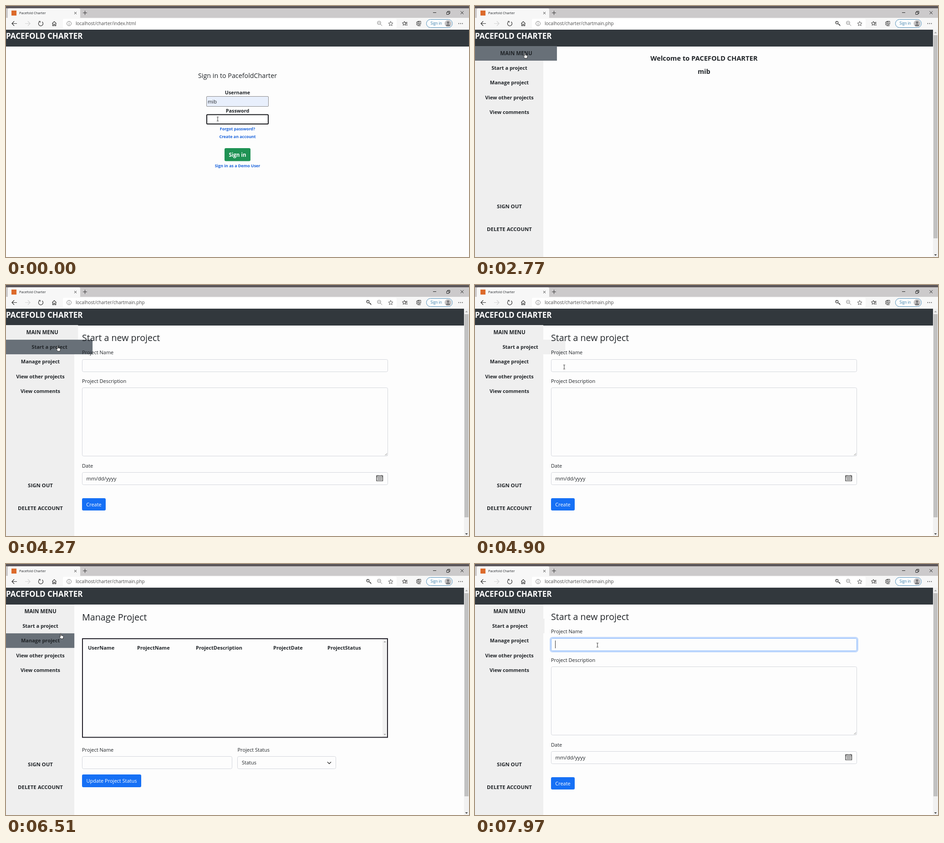
Animation, 1017 px wide and 551 px high, one loop 8000 ms. Source, as an HTML page with a canvas:

```html
<!DOCTYPE html>
<html lang="en">
<head>
<meta charset="utf-8">
<title>Pacefold Charter</title>
<style>
html, body { margin: 0; width: 100%; height: 100%; overflow: hidden; background: #fdfdfd; }
canvas { display: block; }
</style>
</head>
<body>
<canvas id="stage" width="1017" height="551"></canvas>
<script>
const ctx = document.getElementById('stage').getContext('2d');
const LOOP = 8000, INK = '#202428', BLUE = '#1670f5', LINK = '#1a63dc', LINE = '#d3d6dc';
const CLICK = 1600, HOME = 1950, START = 4200, MANAGE = 5420, AGAIN = 7300, FOCUS = 7870;

// ---- drawing helpers ----
function rect(x, y, w, h, color) {
  ctx.fillStyle = color;
  ctx.fillRect(x, y, w, h);
}

function box(x, y, w, h, r, fill, stroke, width = 1) {
  ctx.beginPath();
  ctx.roundRect(x, y, w, h, r);
  if (fill) { ctx.fillStyle = fill; ctx.fill(); }
  if (stroke) { ctx.strokeStyle = stroke; ctx.lineWidth = width; ctx.stroke(); }
}

// y is the middle of the capital letters
function text(str, x, y, size = 11, weight = 400, color = INK, align = 'left') {
  ctx.font = `${weight} ${size}px "Open Sans", "Noto Sans", sans-serif`;
  ctx.textAlign = align;
  ctx.fillStyle = color;
  ctx.fillText(str, x, y + size * 0.357);
}

const bold = (str, x, y, size = 11, color = INK) => text(str, x, y, size, 700, color, 'center');

function line(d, color = '#3c3c3c', width = 1.1) {
  ctx.strokeStyle = color;
  ctx.lineWidth = width;
  ctx.stroke(new Path2D(d));
}

function shape(d, color) {
  ctx.fillStyle = color;
  ctx.fill(new Path2D(d));
}

const circle = (x, y, r) => `M${x - r} ${y}a${r} ${r} 0 1 0 ${2 * r} 0a${r} ${r} 0 1 0 ${-2 * r} 0`;

function star(x, y, r) {
  const points = Array.from({ length: 10 }, (_, i) => {
    const a = i * Math.PI / 5 - Math.PI / 2, k = i % 2 ? r * 0.45 : r;
    return `${x + k * Math.cos(a)} ${y + k * Math.sin(a)}`;
  });
  return `M${points.join('L')}Z`;
}

function field(x, y, w, h) {
  box(x + .5, y + .5, w - 1, h - 1, 3, '#fdfdfd', LINE);
}

function button(label, x, y, w, h) {
  box(x, y, w, h, 3, BLUE);
  text(label, x + w / 2, y + h / 2 + .5, 11, 400, '#fff', 'center');
}

// ---- motion helpers ----
// the standard CSS "ease" curve
function ease(p) {
  if (p <= 0) return 0;
  if (p >= 1) return 1;
  const bez = (a, b, u) => 3 * a * u * (1 - u) ** 2 + 3 * b * u * u * (1 - u) + u ** 3;
  let lo = 0, hi = 1;
  for (let i = 0; i < 20; i++) {
    const mid = (lo + hi) / 2;
    if (bez(.25, .25, mid) < p) lo = mid; else hi = mid;
  }
  return bez(.1, 1, lo);
}

// toggles alternate between pointer entering and leaving
function hover(toggles, t) {
  let from = 0, to = 0, since = 0, span = 1;
  const at = time => from + (to - from) * ease((time - since) / span);
  for (const time of toggles) {
    if (time > t) break;
    from = at(time);
    to = 1 - to;
    since = time;
    span = 1500 * Math.abs(to - from) + 1;
  }
  return { on: to === 1, grow: at(t) };
}

// time, x, y, pointer kind until the next stop
const PATH = [
  [0, 465, 248, 'beam'], [650, 465, 248, 'beam'], [800, 473, 262, 'arrow'],
  [1250, 497, 324, 'hand'], [1450, 498, 334, 'hand'], [HOME, 498, 334, 'arrow'],
  [2240, 160, 116, 'hand'], [2420, 110, 107, 'hand'], [3400, 113, 112, 'hand'],
  [3600, 117, 133, 'hand'], [3850, 114, 140, 'hand'], [4500, 116, 139, 'hand'],
  [4800, 172, 147, 'hand'], [4870, 190, 164, 'beam'], [4900, 196, 180, 'beam'],
  [5060, 188, 180, 'arrow'], [5160, 150, 173, 'hand'], [5350, 113, 172, 'hand'],
  [5500, 114, 174, 'hand'], [5610, 118, 190, 'hand'], [5660, 155, 198, 'arrow'],
  [5900, 240, 240, 'arrow'], [6250, 220, 190, 'arrow'], [6490, 130, 160, 'hand'],
  [6510, 122, 158, 'hand'], [6800, 113, 172, 'hand'], [7050, 112, 156, 'hand'],
  [7250, 108, 142, 'hand'], [7500, 199, 154, 'arrow'], [7550, 235, 172, 'beam'],
  [7650, 269, 178, 'beam'], [LOOP, 269, 178, 'beam']
];

const MENU = [
  ['MAIN MENU', [2240, 3495]],
  ['Start a project', [3495, 4870, 7050, 7500]],
  ['Manage project', [5160, 5630, 6500, 7050]],
  ['View other projects', []],
  ['View comments', []]
];

function pointer(t) {
  let i = PATH.findIndex(k => k[0] > t) - 1;
  if (i < 0) i = PATH.length - 2;
  const [t0, x0, y0, kind] = PATH[i], [t1, x1, y1] = PATH[i + 1];
  const p = (t - t0) / (t1 - t0);
  ctx.save();
  ctx.translate(x0 + (x1 - x0) * p, y0 + (y1 - y0) * p);
  if (kind === 'beam') {
    line('M-2 -4.5H-.5L0 -4L.5 -4.5H2M0 -4V4M-2 4.5H-.5L0 4L.5 4.5H2', '#333', 1);
  } else {
    const d = kind === 'hand'
      ? 'M-2.5 1V-5.2Q-1.7 -6.6 -.8 -5.2V-1.2L3 -.4Q4.3 0 4.2 1.5L3.4 6H-1.6L-4.8 1.8Q-4.6 .2 -2.5 1.6Z'
      : 'M-3 -6V5L-.6 2.8L1 6.5L2.6 5.8L1 2.3H4.4Z';
    shape(d, '#fff');
    line(d, '#222', .9);
  }
  ctx.restore();
}

// ---- browser frame ----
function chrome(t) {
  const loading = t >= CLICK && t < HOME;
  rect(0, 0, 1017, 5, '#5b565a');
  rect(0, 5, 1017, 21, '#cccacb');
  rect(0, 26, 1017, 26, '#f7f7f7');
  box(4, 5, 159, 24, [3, 3, 0, 0], '#f7f7f7');
  if (loading) {
    const a = t / 150;
    ctx.beginPath();
    ctx.arc(17, 15, 4, a, a + 1.5);
    ctx.strokeStyle = '#666';
    ctx.lineWidth = 1.3;
    ctx.stroke();
  } else {
    rect(12, 10, 11, 11, '#dc6a2b');
  }
  text('Pacefold Charter', 29, 15.5, 7.5);
  line('M150 13L155 18M155 13L150 18M169 15H178M173.5 10.5V19.5', '#333', 1);
  line('M938 14.5H945M998.5 11.5L1005 18M1005 11.5L998.5 18', '#222', 1);
  line('M968 13.5H973V18.5H968ZM970 13V11.5H975V16.5H973', '#222', 1);

  line('M24 38.5H13M18 33.5L13 38.5L18 43.5', '#333', 1.2);
  line('M42 38.5H53M48 33.5L53 38.5L48 43.5', '#d2d2d2', 1.2);
  if (loading) line('M72.5 34.5L80.5 42.5M80.5 34.5L72.5 42.5', '#333', 1.2);
  else line('M73.5 34.5A5 5 0 1 0 79.5 34.7M72 33.5H75V36.5', '#333', 1.2);
  line('M101.5 38.5L106 34L110.5 38.5M102.5 37.5V43.5H104.8V40H107.2V43.5H109.5V37.5', '#333', 1.2);

  box(125, 28, 733, 21, 3, '#fff');
  line(circle(138.5, 38.5, 4.8) + 'M138.5 37.5V41.5M138.5 35V36.2', '#666', .9);
  text('localhost/charter/' + (t < HOME ? 'index.html' : 'chartmain.php'), 153, 38.5, 10, 400, '#4c4c4c');
  if (t >= CLICK) line(circle(795, 36.5, 2.8) + 'M797 38.5L802.5 43.5M800 41.2L801.5 40M794 35.5H795', '#333', 1.2);
  line(circle(819.5, 37, 3.7) + 'M822.2 39.7L826 43.5M817.8 37H821.2', '#777', 1);
  line(star(845, 39, 5.3), '#555', 1);
  line(star(875, 38.5, 4.8) + 'M877 36H882M878 39H882M879 42H882', '#333', 1);
  line('M902 35H908V41.5H902ZM904.5 35V33.5H911V40H908M905 36.5V40M903.3 38.2H906.7M904 43.5H910V42', '#333', 1);
  box(923.5, 29.5, 57, 18, 9, '#fbfdfe', '#4e8db8');
  text('Sign in', 932.5, 38.5, 8.1, 400, '#367ba9');
  shape(circle(971, 38.5, 7.5), '#c4c2c3');
  shape(circle(971, 36.4, 2.6) + 'M966.5 44Q966.5 40 971 40Q975.5 40 975.5 44Z', '#77777a');
  for (const x of [994.5, 998.5, 1002.5]) shape(circle(x, 38.5, .9), '#333');
}

function header(w) {
  rect(0, 52, w, 37, '#32383d');
  text('PACEFOLD CHARTER', 0, 66, 17, 700, '#fff');
}

// ---- pages ----
function login(t) {
  const clicked = t >= CLICK, over = t >= 1250;
  header(1017);
  text('Sign in to PacefoldCharter', 508.5, 153, 14.3, 400, INK, 'center');
  bold('Username', 508.5, 190.5, 10.8);
  box(440.5, 198.5, 136, 22, 1.5, '#e8effc', '#8a8a8a');
  text('mib', 443, 210.5, 11.1);
  bold('Password', 508.5, 230, 10.8);
  if (clicked) box(440.5, 238, 136, 21.5, 1.5, '#fff', '#8a8a8a');
  else box(441, 238.5, 135, 20.5, 1.5, '#fff', '#17181c', 2);
  [250, 420, 600].forEach((at, i) => {
    if (t >= at) shape(circle(445.3 + i * 4.8, 249, 1.7), '#222');
  });
  bold('Forgot password?', 508.5, 269.5, 8.85, LINK);
  bold('Create an account', 508.5, 287, 8.85, LINK);
  if (clicked) box(478, 310, 61, 32, 4.5, '#94c9ab');
  box(480, 312, 57, 28.5, 3, over ? '#177d47' : '#1f9254');
  bold('Sign in', 508.5, 326.5, 11.5, '#fff');
  bold('Sign in as a Demo User', 508.5, 350.5, 8.85, LINK);
}

function sidebar(t) {
  rect(0, 89, 150, 462, '#efefef');
  MENU.forEach(([label, toggles], i) => {
    const { on, grow } = hover(toggles, t), w = 150 + 49 * grow, y = 88 + 32.1 * i;
    if (on) rect(0, y, w, 32, '#687078');
    else if (grow > 0) rect(0, y, w, 32, '#efefef');
    bold(label, w / 2 + .5, y + 16.3, i ? 11 : 11.5);
  });
  bold('SIGN OUT', 75.5, 440, 11.4);
  bold('DELETE ACCOUNT', 75.5, 489.5, 11.4);
}

function scrollbar() {
  rect(1006, 52, 11, 499, '#f1f1f1');
  rect(1007, 64, 9, 446, '#c1c1c1');
  shape('M1008.5 60L1011.5 56.5L1014.5 60Z', '#aaa');
  shape('M1008.5 545L1011.5 548.5L1014.5 545Z', '#505050');
}

function welcome() {
  bold('Welcome to PACEFOLD CHARTER', 503, 115, 14.7);
  bold('mib', 503, 143.5, 14.3);
}

function startForm(t) {
  text('Start a new project', 167, 116.5, 19.6, 500);
  text('Project Name', 167, 148.5);
  field(167, 163, 672, 28);
  const focus = t >= FOCUS ? Math.min(1, (t - FOCUS) / 90) : 0;
  if (focus) {
    ctx.globalAlpha = focus;
    box(165.5, 161.5, 675, 31, 4.5, null, '#c3dafd', 3);
    box(167.5, 163.5, 671, 27, 3, '#fdfdfd', '#86b7fe');
    ctx.globalAlpha = 1;
    rect(176, 168, 1, 17, '#333');
  }
  text('Project Description', 167, 211.5);
  field(167, 225, 672, 151);
  line('M832.5 374L837 369.5M835.5 374L837 372.5', '#777', .9);
  text('Date', 167, 397);
  field(167, 411, 672, 28);
  text('mm/dd/yyyy', 176.5, 425, 11.3);
  line('M814 418.5H827.5V430H814ZM814 421H827.5', '#222', 1.2);
  line('M816 424H826M816 427H826M817 417V419M824.5 417V419', '#333', 1);
  line('M817.5 421V430M820.8 421V430M824.1 421V430', '#888', .6);
  button('Create', 167, 468, 52, 27);
}

function manageForm() {
  text('Manage Project', 167, 116.5, 19.7, 500);
  rect(827, 164, 11, 216, '#f1f1f1');
  shape('M829.5 172L832 169L834.5 172Z', '#a0a0a0');
  shape('M829.5 373L832 376L834.5 373Z', '#a0a0a0');
  box(168, 164, 670, 216.5, 0, null, '#201e27', 2);
  const heads = { UserName: 180, ProjectName: 288, ProjectDescription: 417, ProjectDate: 587, ProjectStatus: 706 };
  for (const name in heads) text(name, heads[name], 184, 11, 700);
  text('Project Name', 167, 408.5);
  field(167, 422, 330, 28);
  text('Project Status', 508.5, 408.5);
  field(508, 422, 217, 28);
  text('Status', 518, 436.5);
  line('M706 434.5L710 438.5L714 434.5', '#333', 1.4);
  button('Update Project Status', 167, 462, 130, 28);
}

function draw(t) {
  rect(0, 0, 1017, 551, '#fdfdfd');
  chrome(t);
  if (t < HOME) {
    login(t);
  } else {
    header(1006);
    sidebar(t);
    if (t < START) welcome();
    else if (t >= MANAGE && t < AGAIN) manageForm();
    else startForm(t);
    scrollbar();
  }
  pointer(t);
}

function tick(now) {
  draw(now % LOOP);
  requestAnimationFrame(tick);
}
requestAnimationFrame(tick);
</script>
</body>
</html>
```
